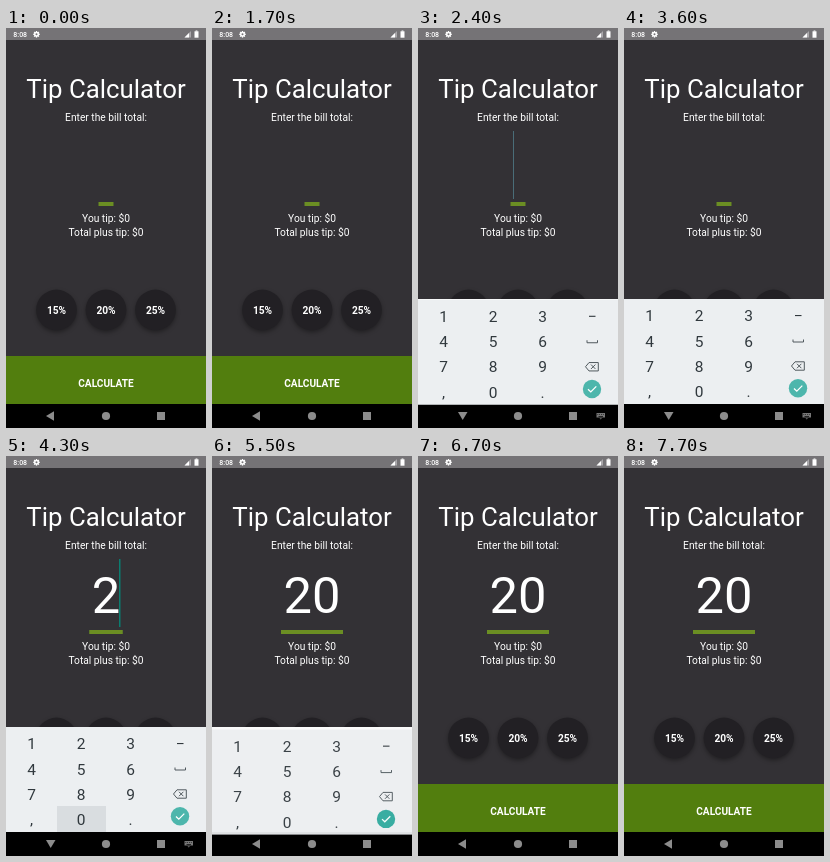
Write an HTML page with a canvas that moves like this. It is 200x400 px and loops after 8 s.

```html
<!DOCTYPE html>
<html lang="en">
<head>
<meta charset="utf-8">
<title>Tip Calculator</title>
<style>
  html, body { margin: 0; width: 100%; height: 100%; overflow: hidden; background: #333135; }
  canvas { display: block; width: 200px; height: 400px; }
</style>
</head>
<body>
<canvas id="stage" width="200" height="400"></canvas>
<script>
const ctx = document.getElementById('stage').getContext('2d');
const LOOP = 8000;
const PANEL_TOP = 271, NAV_TOP = 376;
const COLUMNS = [25.5, 75, 124.5, 174];
const ROWS = [287.7, 313, 338.2, 363.7];
const KEYS = ['123', '456', '789', ',0.'];

const between = (t, a, b) => t >= a && t < b;

function rect(x, y, w, h, color) {
  ctx.fillStyle = color;
  ctx.fillRect(x, y, w, h);
}

function circle(x, y, r, color) {
  ctx.fillStyle = color;
  ctx.beginPath();
  ctx.arc(x, y, r, 0, Math.PI * 2);
  ctx.fill();
}

function trace(points, closed) {
  ctx.beginPath();
  points.forEach(([x, y]) => ctx.lineTo(x, y));
  if (closed) ctx.closePath();
}

function polygon(points, color) {
  trace(points, true);
  ctx.fillStyle = color;
  ctx.fill();
}

function stroke(points, color, width, closed) {
  trace(points, closed);
  ctx.strokeStyle = color;
  ctx.lineWidth = width;
  ctx.stroke();
}

function text(str, x, baseline, size, weight = 400, color = '#fff') {
  ctx.font = `${weight} ${size}px Roboto, sans-serif`;
  ctx.textAlign = 'center';
  ctx.fillStyle = color;
  ctx.fillText(str, x, baseline);
}

function statusBar() {
  rect(0, 0, 200, 12, '#757376');
  text('8:08', 14.2, 8.9, 7, 500);
  for (let i = 0; i < 4; i++) {
    const a = i * Math.PI / 4, dx = Math.cos(a) * 3.3, dy = Math.sin(a) * 3.3;
    stroke([[30.5 - dx, 6.3 - dy], [30.5 + dx, 6.3 + dy]], '#fff', 1.3);
  }
  circle(30.5, 6.3, 2.5, '#fff');
  circle(30.5, 6.3, 1, '#757376');
  polygon([[178.5, 9.5], [185, 9.5], [185, 3]], '#aaa8ab');
  polygon([[178.5, 9.5], [183, 9.5], [183, 5]], '#fff');
  rect(188.5, 3.3, 4, 6.4, '#fff');
  rect(189.6, 2.5, 1.8, 1, '#fff');
}

function tipButton(label, x) {
  ctx.save();
  ctx.shadowColor = 'rgba(0,0,0,.35)';
  ctx.shadowBlur = 4;
  ctx.shadowOffsetY = 2;
  circle(x, 282, 20.4, '#222024');
  ctx.restore();
  text(label, x, 286, 10.2, 700);
}

function cursor(t, amount) {
  const visible = between(t, 1900, 3400) || between(t, 3800, 5400);
  if (!visible) return;
  if (!amount) rect(95, 103, 1, 68, '#4a6d78');
  else rect(amount.length === 1 ? 113 : 127.3, 103, 1.5, 68, '#0b7d70');
}

function app(t) {
  const amount = t < 3800 ? '' : t < 4400 ? '2' : '20';
  rect(0, 0, 200, 400, '#333135');
  statusBar();
  text('Tip Calculator', 100, 70, 25.8);
  text('Enter the bill total:', 100, 93, 10.22);
  text(amount, 100, 157, 50.7);
  const line = amount ? 5 + 28.5 * amount.length : 15;
  rect(100 - line / 2, 174, line, 4, '#6b8e23');
  cursor(t, amount);
  text('You tip: $0', 100, 194, 10.22);
  text('Total plus tip: $0', 100, 208, 10.22);
  ['15%', '20%', '25%'].forEach((label, i) => tipButton(label, 50.5 + i * 49.5));
  rect(0, 328, 200, 48, '#527e0e');
  text('CALCULATE', 100, 359.2, 10.1, 700);
}

function keyboard(t, offset, alpha) {
  const ink = '#30383d', soft = '#50595e';
  ctx.save();
  ctx.globalAlpha = alpha;
  ctx.translate(0, offset);
  rect(0, PANEL_TOP, 200, 105, '#eceff1');
  if (between(t, 3700, 3800)) rect(51, 275, 49, 25, '#d9dde0');
  if (between(t, 4300, 4400)) rect(51, 350, 49, 26, '#d9dde0');

  KEYS.forEach((row, r) => [...row].forEach((key, c) =>
    text(key, COLUMNS[c], ROWS[r] + 5.5, 15.5, 400, ink)));

  rect(171, 287, 6.5, 1.1, ink);
  stroke([[169, 311.5], [169, 314], [179.5, 314], [179.5, 311.5]], soft, 1);
  stroke([[167.5, 338], [171, 333.8], [180.3, 333.8], [180.3, 342.2], [171, 342.2]], soft, 1, true);
  stroke([[173, 335.8], [177.4, 340.2]], soft, 1);
  stroke([[177.4, 335.8], [173, 340.2]], soft, 1);

  circle(174, 360.3, 9.2, between(t, 5400, 5600) ? '#2fa99d' : '#4db6ac');
  stroke([[170, 360.5], [172.8, 363.2], [178.3, 357.6]], '#fff', 1.3);
  ctx.restore();
}

function navIcons(typing) {
  const gray = '#8c8c8c';
  polygon(typing ? [[40, 384], [49.5, 384], [44.7, 392]]
                 : [[40, 388], [48, 383.3], [48, 392.7]], gray);
  circle(100, 388, 4.1, gray);
  rect(151, 384, 8, 8, gray);
  if (!typing) return;
  rect(178.5, 385, 8.5, 4.5, '#777');
  for (let x = 179.5; x < 186; x += 1.8) rect(x, 386, 0.7, 0.8, '#000');
  rect(180.5, 388, 4.5, 0.7, '#000');
  polygon([[181.5, 390.3], [184, 390.3], [182.75, 391.6]], '#777');
}

function draw(t) {
  app(t);
  rect(0, NAV_TOP, 200, 24, '#000');
  if (between(t, 2100, 5600)) {
    rect(0, PANEL_TOP, 200, 105, '#fafafa');
    const enter = Math.min(1, (t - 2100) / 400);
    const leaving = t >= 5500;
    const offset = leaving ? 2.6 : 12 * (1 - enter) ** 2;
    keyboard(t, offset, leaving ? 0.95 : Math.min(1, enter * 2));
  }
  navIcons(between(t, 2100, 5500));
}

const start = performance.now();
function tick() {
  const t = (performance.now() - start) % LOOP;
  draw(Math.floor(t / 100) * 100);
  requestAnimationFrame(tick);
}
tick();
</script>
</body>
</html>
```
